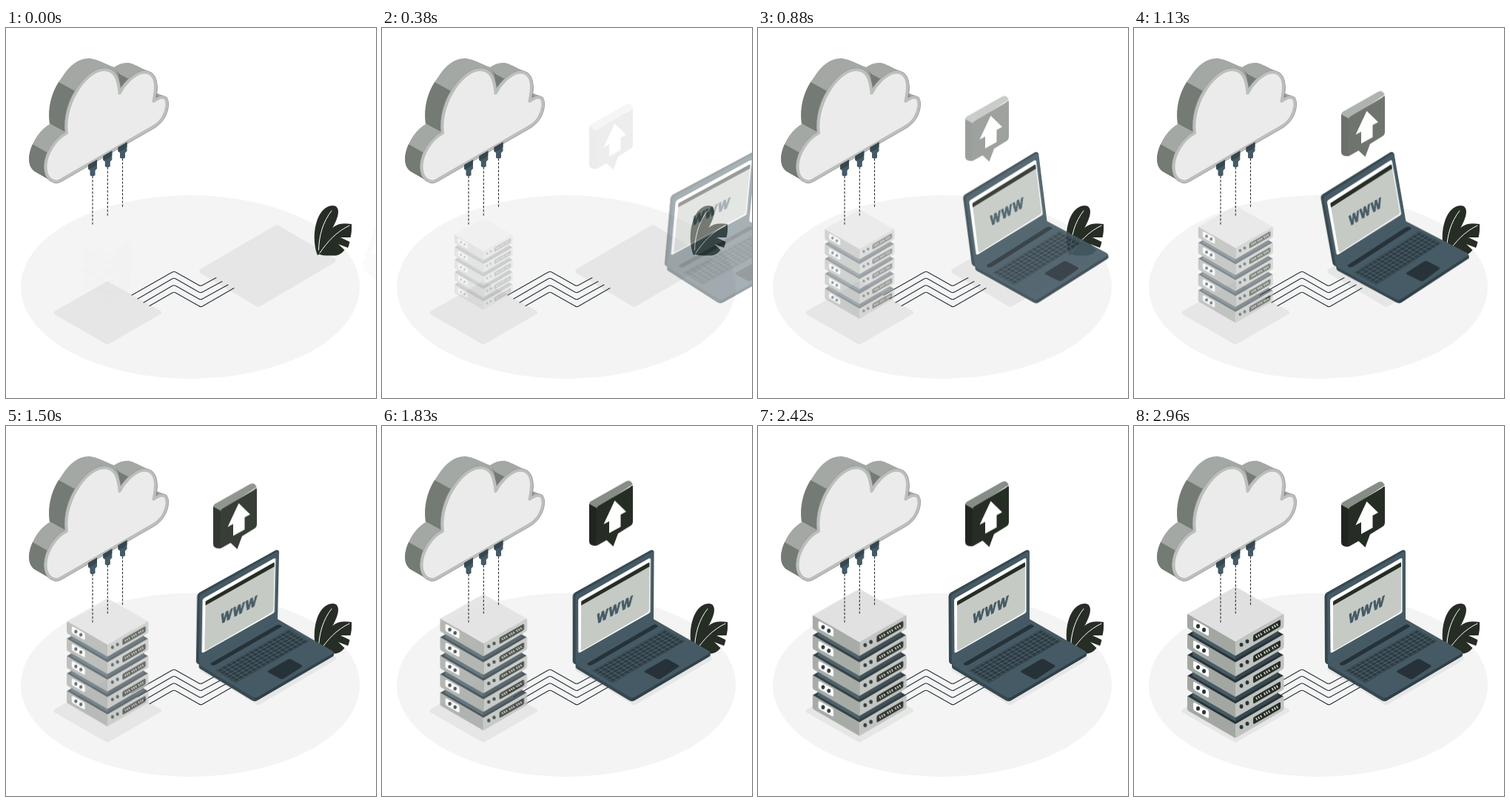
These frames come from a looping animation (500x500 px, 3040 ms). An HTML page:

```html
<!DOCTYPE html>
<html lang="en">
<head>
<meta charset="utf-8">
<title>Cloud hosting</title>
<style>
  html, body { margin: 0; width: 100%; height: 100%; overflow: hidden; background: #fff; }
  svg { display: block; width: 100vw; height: 100vh; }

  #server, #laptop, #badge { animation: 3s ease-out both paused; }
  #server { animation-name: grow; transform-origin: 137.5px 318.5px; }
  #laptop { animation-name: rush; animation-duration: 2s; transform-origin: 350px 264px; }
  #badge { animation-name: rise; animation-duration: 2.5s; animation-timing-function: cubic-bezier(.36, -.01, .5, 1.38); }

  @keyframes grow { from { opacity: 0; transform: scale(.5); } }
  @keyframes rise { from { opacity: 0; transform: translateY(30px); } }
  @keyframes rush {
    0% { opacity: 0; transform: translateX(250px) skewX(-20deg); }
    60% { opacity: 1; transform: translateX(0) skewX(10deg); }
    80% { opacity: 1; transform: translateX(0) skewX(-2deg); }
    100% { opacity: 1; transform: translateX(0) skewX(0deg); }
  }

  .round { stroke-linejoin: round; stroke-linecap: round; }
  .wire { fill: none; stroke: #263238; stroke-width: 1.1; }
  .vein { fill: none; stroke: #fff; stroke-width: 1; stroke-linecap: round; }
  .leaf, .ink { fill: #262d25; }
  .navy { fill: #263238; }
  .slate { fill: #37474f; }
  .steel { fill: #455a64; }
  .www {
    font: bold 19px "Liberation Sans", Arial, sans-serif; letter-spacing: 2px;
    fill: #455a64; stroke: #455a64; stroke-width: 1.2;
  }
</style>
</head>
<body>
<svg viewBox="0 0 500 500">
  <defs>
    <pattern id="keys" width="6.125" height="4.8" patternUnits="userSpaceOnUse">
      <rect x=".4" y=".4" width="5.3" height="4" rx=".6" fill="#2c3a42"/>
    </pattern>

    <path id="front" class="round" d="M67.500 207.500C58 206 53.500 198 53.500 187C54 170 66 150 82 142C79 121 87 97 99 80C109 65 123 55 136 56.500C148 58.500 152 70 153.500 88C159 77 170 65 182 60.500C195 57 202 66 202 79C202 86 201 92 199.500 99C206 94 212 92.500 215.500 95.500C219 100 218 111 212 121C208 128 204 130.500 199 133.500L74 205.500Q70 207.800 67.500 207.500Z"/>

    <g id="plug">
      <path class="steel" d="M111 185L123 178V190L120.500 192.500V199Q117 201.500 113.500 199V192.500L111 190.500Z"/>
      <path class="slate" d="M111 185L123 178V184Q117 190 111 190.500Z"/>
      <path class="wire" stroke-dasharray="3.200 2" d="M117 200V267"/>
    </g>

    <!-- one server unit -->
    <g id="unit">
      <path fill="var(--top)" d="M137 217L202 254 137 292 72 254Z"/>
      <path fill="#a3a7a2" d="M72.500 254L137 291.500V310.500L74 274Q72 273 72 271V255Z"/>
      <path fill="#c0c3bf" d="M137 291.500L201.500 254Q202.500 254 202.500 256V270Q202.500 272.500 200.500 273.500L137 310.500Z"/>
      <path fill="#fff" d="M82 262.500L99 272Q101 273.500 101 275V282Q101 284 99 283L82 273.500Q80 272 80 270.500V264Q80 261.500 82 262.500Z"/>
      <g class="navy">
        <ellipse cx="86.500" cy="270.500" rx="2.500" ry="2.900"/>
        <ellipse cx="94.500" cy="275.500" rx="2.500" ry="2.900"/>
        <ellipse cx="145" cy="295.500" rx="2.400" ry="2.800"/>
        <ellipse cx="153" cy="291" rx="2.400" ry="2.800"/>
        <path class="ink" d="M163 281.500L196 262.500Q198 261.500 198 263.500V269Q198 271 196 272L163 291Q161 292 161 290V284.500Q161 282.500 163 281.500Z"/>
      </g>
      <path fill="none" stroke="#e6e6e6" stroke-width="3.400" stroke-dasharray="1.500 2 1.500 2 1.500 4" d="M165 285L196 267.200"/>
    </g>
    <!-- unit with the recessed neck that carries the next one -->
    <g id="tier">
      <use href="#unit"/>
      <path class="steel" d="M79 242L137 276V288L79 254.500Z"/>
      <path class="slate" d="M137 276L195 242V254.500L137 288Z"/>
    </g>
  </defs>

  <ellipse cx="249" cy="350" rx="229" ry="124" fill="#f4f4f4"/>
  <g class="round" fill="#e6e6e6" stroke="#e6e6e6" stroke-width="5">
    <path d="M67 385L137 345 207.500 384.500 137 425Z"/>
    <path stroke-width="7" d="M265 328.500L366 269.500 442 314 341 373.500Z"/>
  </g>

  <g class="wire round">
    <path d="M170 361L224.500 330Q227 328.500 229.500 330L260.500 347.500Q263 349 265.500 347.500L284 337.500"/>
    <path d="M178 366L224.500 339Q227 337.500 229.500 339L260.500 356.800Q263 358.300 265.500 356.800L292 342.500"/>
    <path d="M186 371L224.500 348.500Q227 347 229.500 348.500L260.500 366Q263 367.500 265.500 366L300 347"/>
    <path d="M194 375.500L224.500 358Q227 356.500 229.500 358L260.500 375.500Q263 377.500 265.500 376L308 351.500"/>
  </g>

  <!-- plant -->
  <path class="leaf" d="M421 307C415 292 415 268 424 252C430 242 439 238 446 241C452 246 448 257 443 267C436 281 428 290 425 305Z"/>
  <path class="leaf" d="M424 306C424 290 432 276 444 268C451 263 460 264 467 265Q467.500 276 465.500 283L452 283 464.500 289Q463.500 294 462 297L449 292 457.500 300Q453 306 446 307.500L437 307.500Q429 308 424 306Z"/>
  <path class="vein" d="M422.500 300C423 281 428 262 440 247"/>
  <path class="vein" d="M424 304C435 288 447 275 464 267"/>

  <!-- server -->
  <g id="server" style="--top:#263238">
    <use href="#tier" y="111.200"/>
    <use href="#tier" y="83.400"/>
    <use href="#tier" y="55.600"/>
    <use href="#tier" y="27.800"/>
    <use href="#unit" style="--top:#e0e0e0"/>
  </g>

  <!-- cloud -->
  <path fill="#a4a8a4" d="M67 210L39 194C33 190 31 184 31 177C32 160 43 139 59 130C56 107 63 84 76 66C87 49 101 39 116 41.500C125 43 138 50 146 53C153 48 161 46 168 47.500C174 49 184 55 196 60C203 65 206 77 204 88L218 94 200 134Z"/>
  <g fill="#747a74">
    <path d="M71 73L93 85C82 102 77 122 81 141L59 129C56 109 61 89 71 73Z"/>
    <path d="M36 157L57 169C47 186 51 203 67 210L39 194C29 187 29 172 36 157Z"/>
    <path d="M148 56C154 64 153 76 155 88L168 70 153 62Z"/>
    <path d="M199 63C204 69 205 78 204 88L205 95 200 98Z"/>
  </g>
  <g fill="#ebebeb">
    <use href="#front" stroke="#8d918d" stroke-width="5"/>
    <use href="#front" stroke="#bbbebb" stroke-width="4"/>
  </g>
  <use href="#plug"/>
  <use href="#plug" x="20.300" y="-12"/>
  <use href="#plug" x="40.500" y="-23.800"/>

  <!-- upload badge -->
  <g id="badge">
    <path fill="#868c86" d="M280 107Q280 104 283 102.500L329 76.500Q333 74.500 336 76L339 80 290 112.500Z"/>
    <path fill="#20261f" d="M280 106.500L290 112V163Q285 163.500 282 161.500 280 160 280 157Z"/>
    <path class="ink" d="M290 113.500Q290 110.500 293 109L335 84Q339 80 339 83V130Q339 134 336 136L319 146.500 312.500 164 303.500 155.500 292 162Q290 163 289 163Z"/>
    <path fill="#fff" d="M314.500 102L330 117 322.500 121V137.500L307 146V130L299.500 134Z"/>
  </g>

  <!-- laptop -->
  <g id="laptop">
    <path class="slate" d="M262 321L339 367V372Q337 372 335 371L263.500 328Q262 327 262 325Z"/>
    <path fill="#2f3f48" d="M339 366L444 306V309.500Q444 311 442 312L342 371Q340 372 338 372Z"/>
    <path class="steel" d="M262 322L367 261 442 304Q445 306 442 308L342 366.500Q339 368 336 366.500L264 324Z"/>
    <path class="slate" d="M257.500 231Q257.500 227 260.500 225L362 168Q366 166.500 367 170V262L263 322Q258 322 258 317Z"/>
    <path class="steel" d="M261 231Q261 229 263 227.500L364 170Q367 169 367 172V262L264 321.500 262 320Z"/>
    <path fill="#fff" d="M265 236Q265 234 267 232.500L360 179Q362.500 178 362.500 180V250Q362.500 252 361 253L268 306Q265.500 307 265.500 305Z"/>
    <path fill="#c6cac5" d="M269 241L361 188.500V248Q361 250.500 359 252L272 302.500Q269 304 269 301Z"/>
    <path class="ink" d="M269 238Q269 236.500 270.500 236L360 184.500Q361 184 361 185.500V190L269 242.500Z"/>
    <text class="www round" transform="matrix(.82 -.44 -.08 1 290 267.500)">WWW</text>

    <path class="navy" d="M278 320.500L366 269Q369 267.500 372 269.500 374 270.500 371.500 272L285 322.500Q281 324.500 278 322.500Z"/>
    <path class="slate" d="M284.500 330.500L382.500 274.500 410 290.500 312 347.500Z"/>
    <path fill="#50656f" d="M286 330.500L382.500 275.500 408 290.500 312 346Z"/>
    <rect width="98" height="28.800" fill="url(#keys)" transform="matrix(.985 -.561 .903 .538 286 330.500)"/>
    <path class="navy" d="M356 330.500L382 315.500Q384.500 314 387 315.500L400.500 323Q403 324.500 400.500 326L377 341.500Q374.500 343 372 341.500L356 333Q354 332 356 330.500Z"/>
  </g>
</svg>
<script>
  const LOOP = 3040, STEP = 1000 / 24, LAST = 71;
  const parts = document.getAnimations();
  const start = performance.now();

  // Motion advances at 24 steps a second, posed at the middle of each step.
  function draw() {
    const t = Math.max(0, performance.now() - start) % LOOP;
    const step = Math.min(Math.floor((t + 4) / STEP), LAST);
    for (const part of parts) part.currentTime = (step + .5) * STEP;
    requestAnimationFrame(draw);
  }
  draw();
</script>
</body>
</html>
```
